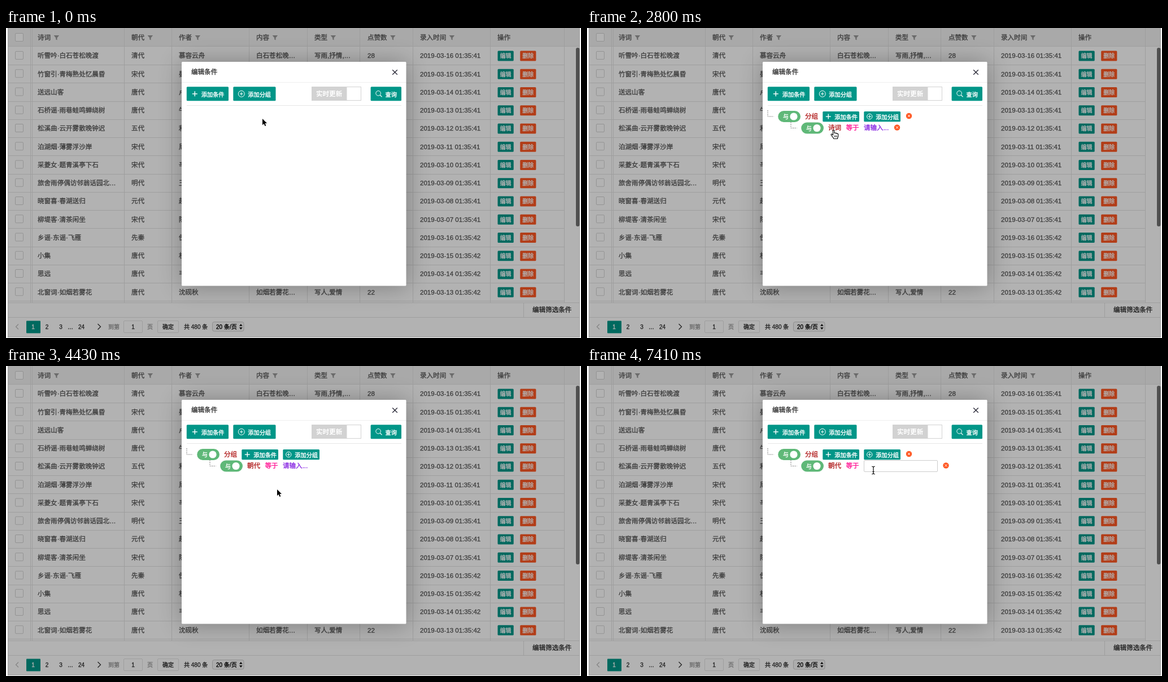
Write an HTML page with a canvas that moves like this. It is 1018 px wide and 550 px high and loops after 8000 ms.

```html
<!DOCTYPE html>
<html lang="zh-CN">
<head>
<meta charset="utf-8">
<style>
html, body { margin: 0; width: 100%; height: 100%; overflow: hidden; background: #fff; }
canvas { display: block; }
</style>
</head>
<body>
<canvas id="stage" width="1018" height="550"></canvas>
<script>
const c = document.getElementById('stage').getContext('2d');
const FONT = '"Liberation Sans", "Noto Sans CJK SC", "Noto Sans CJK", sans-serif';
const TEAL = '#009688', ORANGE = '#ff5722', BASE = 11.56, SMALL = 10;
const LOOP = 8000, TICK = 148.15;

// A hairline stroke thickens regular text slightly
function text(s, x, y, color = '#5a5a5a', size = BASE, weight = 400, align = 'left') {
  c.font = `${weight} ${size}px ${FONT}`;
  c.textAlign = align;
  c.fillStyle = c.strokeStyle = color;
  c.fillText(s, x, y + size * 0.37);
  if (weight > 400) return;
  c.lineWidth = 0.35;
  c.strokeText(s, x, y + size * 0.37);
}
function rect(x, y, w, h, color) {
  c.fillStyle = color;
  c.fillRect(x, y, w, h);
}
function box(x, y, w, h, r, fill, stroke) {
  c.beginPath();
  c.roundRect(x, y, w, h, r);
  if (fill) { c.fillStyle = fill; c.fill(); }
  if (stroke) { c.strokeStyle = stroke; c.lineWidth = 1; c.stroke(); }
}
function line(color, width, ...pts) {
  c.beginPath();
  for (let i = 0; i < pts.length; i += 2) c.lineTo(pts[i], pts[i + 1]);
  c.strokeStyle = color;
  c.lineWidth = width;
  c.stroke();
}
function disc(x, y, r, fill, stroke) {
  c.beginPath();
  c.arc(x, y, r, 0, 7);
  if (fill) { c.fillStyle = fill; c.fill(); }
  if (stroke) { c.strokeStyle = stroke; c.lineWidth = 1; c.stroke(); }
}
function plus(x, y, r, w) {
  line('#fff', w, x - r, y, x + r, y);
  line('#fff', w, x, y - r, x, y + r);
}
function cross(x, y, r, color, w) {
  line(color, w, x - r, y - r, x + r, y + r);
  line(color, w, x - r, y + r, x + r, y - r);
}

const columns = [
  ['诗词', 56], ['朝代', 222], ['作者', 306], ['内容', 443], ['类型', 546],
  ['点赞数', 640], ['录入时间', 733], ['操作', 870]
];
const rows = [
  ['听雪吟·白石苍松晚渡', '清代', '慕容云舟', '白石苍松晚…', '写雨,抒情,…', '28'],
  ['竹窗引·青梅熟处忆晨昏', '宋代', '晏'],
  ['送远山客', '唐代', '卢'],
  ['石桥谣·雨巷蛙鸣蝉绕树', '唐代', '牛'],
  ['松溪曲·云开雾散晚钟迟', '五代', '和'],
  ['泊湖烟·薄雾浮沙岸', '宋代', '周'],
  ['采菱女·题青溪亭下石', '宋代', '辛'],
  ['旅舍雨停偶访邻翁话园北…', '明代', '王'],
  ['晓窗喜·春湖送归', '元代', '赵'],
  ['柳堤客·清茶闲坐', '宋代', '陈'],
  ['乡谣·东谣·飞雁', '先秦', '佚'],
  ['小集', '唐代', '杜'],
  ['思远', '唐代', '韦'],
  ['北窗词·如烟若雾花', '唐代', '沈砚秋', '如烟若雾花…', '写人,爱情', '22']
];

function funnel(x, y) {
  c.beginPath();
  [[0, -4], [9.5, -4], [5.9, 0.5], [5.9, 4.5], [3.6, 3.2], [3.6, 0.5]].forEach(([a, b]) => c.lineTo(x + a, y + b));
  c.fillStyle = '#999';
  c.fill();
}
function checkbox(y) {
  box(16.5, y - 7.5, 14, 14, 1.5, '#fff', '#d2d2d2');
}

function table() {
  const grid = '#e2e2e2';
  rect(3, 0, 1013, 549, '#fff');
  rect(3, 0, 1013, 33, '#f2f2f2');
  checkbox(17);
  for (const [name, x] of columns) {
    text(name, x, 17);
    if (name !== '操作') funnel(x + c.measureText(name).width + 5.5, 17);
  }
  rows.forEach((row, i) => {
    const y = 49 + i * 32.25;
    checkbox(y);
    row.forEach((s, j) => text(s, columns[j][1], y));
    const day = String(16 - i % 10).padStart(2, '0');
    text(`2019-03-${day} 01:35:4${i < 10 ? 1 : 2}`, 733, y);
    [['编辑', 870.5, TEAL], ['删除', 910.2, ORANGE]].forEach(([s, x, color]) => {
      box(x, y - 8.6, 28.2, 18.2, 1.5, color);
      text(s, x + 14.1, y + 0.7, '#fff', SMALL, 400, 'center');
    });
    rect(3, Math.round(y + 16), 985, 1, grid);
  });
  rect(3, 32, 1013, 1, grid);
  [43, 46, 209, 293, 430, 533, 626, 720, 857, 988].forEach(x => rect(x, 0, 1, 487, grid));

  rect(3, 487, 1013, 1, grid);
  rect(3, 513, 1013, 1, grid);
  rect(916, 487, 1, 26, grid);
  text('编辑筛选条件', 932, 500, '#333');
  rect(3, 548, 1013, 1, grid);
  rect(3, 0, 1, 549, grid);
  rect(1015, 0, 1, 549, grid);
  pager();
}

function pager() {
  const y = 530;
  line('#bbb', 1.2, 22, y - 4.5, 17.5, y, 22, y + 4.5);
  box(36, 519.5, 25, 22, 1, TEAL);
  [['1', 48, '#fff'], ['2', 72.5], ['3', 97], ['…', 114], ['24', 133.5]].forEach(
    ([s, x, color = '#333']) => text(s, x, y, color, SMALL, 400, 'center'));
  line('#333', 1.3, 162.5, y - 5, 167.5, y, 162.5, y + 5);
  text('到第', 181, y, '#999', SMALL);
  box(208.5, 519.5, 33, 21, 1.5, '#fff', '#e2e2e2');
  text('1', 225, y, '#333', SMALL, 400, 'center');
  text('页', 250, y, '#999', SMALL);
  box(268.5, 519.5, 37, 21, 1.5, '#fff', '#e2e2e2');
  text('确定', 287, y + 0.5, '#333', SMALL, 400, 'center');
  text('共 480 条', 315, y, '#333', SMALL);
  box(365.5, 521.5, 55.5, 16.5, 3, '#f8f8f8', '#ccc');
  text('20 条/页', 372, y, '#000', SMALL);
  for (const s of [-1, 1]) {
    c.beginPath();
    c.moveTo(413, y + s * 1.3);
    c.lineTo(418.6, y + s * 1.3);
    c.lineTo(415.8, y + s * 5);
    c.fillStyle = '#111';
    c.fill();
  }
}

function button(label, x, y, w, h, hover) {
  const cy = y + h / 2, big = h > 20, ix = x + (big ? 14.5 : 10);
  box(x, y, w, h, 1.5, hover ? '#33aba0' : TEAL);
  if (label === '查询') {
    disc(x + 13.5, cy - 1, 4.3, null, '#fff');
    line('#fff', 1.2, x + 16.7, cy + 2.2, x + 20, cy + 5.5);
  } else if (label === '添加条件') {
    plus(ix, cy, 4.5, 1.4);
  } else {
    disc(ix, cy, big ? 5.5 : 4.7, null, '#fff');
    plus(ix, cy, 2.8, 1);
  }
  text(label, x + (big ? 26 : 21), cy + 1, '#fff', 10.2);
}

function dialog(hover) {
  c.save();
  c.shadowColor = 'rgba(0,0,0,.3)';
  c.shadowBlur = 41;
  c.shadowOffsetX = c.shadowOffsetY = 1;
  box(311, 60, 397.5, 397.5, 1.5, '#fff');
  c.restore();
  rect(311, 96, 397, 1, '#eee');
  text('编辑条件', 328, 78, '#333');
  cross(688.5, 78.5, 4.3, '#2d2c3b', 1.4);
  button('添加条件', 319.8, 104.3, 74.2, 25);
  button('添加分组', 402.3, 104.3, 75.2, 25, hover);
  rect(541, 104, 88, 25, '#d2d2d2');
  text('实时更新', 549, 117, '#fff', BASE, 700);
  rect(603.5, 105, 24.5, 23, '#fff');
  button('查询', 645.6, 104.3, 54.4, 25);
  rect(320, 137, 380, 1, '#e6e6e6');
}

function branch(x, y) {
  c.setLineDash([2, 1.5]);
  line('#777', 1, x, y - 11, x, y, x + 10.5, y);
  c.setLineDash([]);
  box(x + 18.2, y - 10, 39.8, 20, 10, '#5fb878');
  text('与', x + 27, y + 0.5, '#fff', SMALL);
  disc(x + 46, y, 6.6, '#fff');
}
function remover(x, y) {
  disc(x, y, 5.2, ORANGE);
  cross(x, y, 2.1, '#fff', 1);
}

const fields = ['诗词', '朝代', '作者', '内容', '类型', '点赞数', '录入时间'];
const operators = ['筛选数据', '等于', '≠ 不等于', '> 大于', '≥ 大于等于', '< 小于', '≤ 小于等于', '包含', '不包含'];

function menu(items, x, y, selected, mouse, opening) {
  const step = 18.15, h = items.length * step + 1;
  const over = Math.floor((mouse.y - y) / step);
  c.save();
  if (opening) { c.globalAlpha = 0.8; c.translate(0, 5); }
  box(x + 0.5, y + 0.5, 132, h, 2, '#fff', '#e0e0e0');
  items.forEach((s, i) => {
    if (i === selected || (i === over && !opening)) rect(x + 0.5, y + i * step, 132, step + 0.3, '#47cfff');
    text(s, x + 8.5, y + (i + 0.5) * step, '#333');
  });
  if (items === operators) box(x + 125.5, y + 2, 5.5, 112, 2.7, '#7b7b7b');
  c.restore();
}

// Pointer path: tick, x, y
const path = [
  [0, 454, 161], [4, 437, 122], [6, 436, 121], [8, 425, 146], [9, 429, 153],
  [12, 430, 157], [14, 430, 158], [17, 440, 190], [19, 436.5, 181], [20, 436.5, 181],
  [21, 437, 184], [23, 461, 224], [25, 458, 221], [28, 462, 225], [29, 462, 225],
  [30, 480, 219], [34, 468, 180], [36, 468, 180], [37, 470, 182], [39, 492, 198],
  [41, 487, 217], [44, 502, 187], [45, 507, 184], [47, 507, 184], [48, 507, 185], [54, 507, 185]
];
function pointer(k) {
  const i = Math.max(1, path.findIndex(p => p[0] >= k));
  const [a, x0, y0] = path[i - 1], [b, x1, y1] = path[i];
  const f = (k - a) / (b - a);
  return { x: x0 + (x1 - x0) * f, y: y0 + (y1 - y0) * f };
}

const ARROW = new Path2D('M0 0V11.2L2.6 8.8L4.5 13L6.3 12.2L4.6 8.1H8Z');
const HAND = new Path2D('M-1 1.2C-1 -.5 1.5 -.5 1.5 1.2V5.6C2 4.6 3.8 4.8 3.9 6C4.6 5.2 6.1 5.5 6.2 6.7C7 6.1 8.3 6.5 8.3 7.8V10.5C8.3 12.5 7 13.2 7 15.5H.2C0 13.4 -2.2 12 -4.3 8.8C-5 7.3 -3.4 6.5 -2.2 7.8L-1 9Z');

function cursor(kind, { x, y }) {
  c.save();
  c.translate(x, y);
  c.lineJoin = 'round';
  if (kind === 'arrow') {
    c.strokeStyle = '#fff';
    c.lineWidth = 1.8;
    c.stroke(ARROW);
    c.fillStyle = '#000';
    c.fill(ARROW);
  } else if (kind === 'hand') {
    c.fillStyle = '#fff';
    c.fill(HAND);
    c.strokeStyle = '#000';
    c.lineWidth = 1.1;
    c.stroke(HAND);
    for (const d of [1.7, 3.7, 5.7]) line('#000', 0.8, d, 9.5, d, 13);
  } else {
    line('#000', 1.2, 0, -6, 0, 6);
    for (const s of [-1, 1]) line('#000', 1.1, -2.7, s * 7, 0, s * 6, 2.7, s * 7);
    line('#000', 1, -1.6, 2.5, 1.6, 2.5);
  }
  c.restore();
}

function draw(k) {
  const mouse = pointer(k);
  const group = k >= 5, child = k >= 15, input = k >= 47;
  const fieldMenu = k >= 21 && k < 30, opMenu = k >= 37 && k < 42;
  const open = fieldMenu || opMenu;
  const onRows = group && !open && mouse.y >= 147 && mouse.y < 186.5;
  const onTop = k >= 3 && k <= 8, onAdd = k >= 9 && k <= 15;

  c.clearRect(0, 0, 1018, 550);
  table();
  rect(3, 0, 1013, 549, 'rgba(0,0,0,.3)');
  box(1009, 35, 6.5, 317, 3.2, '#505050');
  dialog(onTop);

  if (group) {
    branch(320, 157);
    text('分组', 386, 157, '#b22222');
    button('添加条件', 417.3, 148, 64.7, 18.2, onAdd);
    button('添加分组', 490.3, 148, 64.7, 18.2);
    if (onRows) remover(570, 156);
  }
  if (child) {
    branch(361, 177.5);
    text(k < 30 ? '诗词' : '朝代', 427, 177, '#b22222');
    text('等于', 458.5, 177, '#ff1493');
    if (input) {
      box(490.5, 167.5, 130, 20, 1.5, '#fff', '#ccc');
      if (k < 50) rect(499, 170, 1, 14, '#000');
    } else {
      text('请输入...', 490, 177, '#8a2be2');
    }
    if (onRows && mouse.y >= 167) remover(input ? 635.5 : 549, 176.5);
  }
  if (fieldMenu) menu(fields, 427.5, 193.5, 0, mouse, k === 21);
  if (opMenu) menu(operators, 459, 193, 1, mouse, k === 37);

  const hand = open || onAdd || (onTop && k < 8) || (child && onRows);
  cursor(input ? 'beam' : hand ? 'hand' : 'arrow', mouse);
}

let shown = -1;
function frame(now) {
  const k = Math.min(53, Math.floor((now % LOOP + 20) / TICK));
  if (k !== shown) draw(shown = k);
  requestAnimationFrame(frame);
}
frame(0);
</script>
</body>
</html>
```
